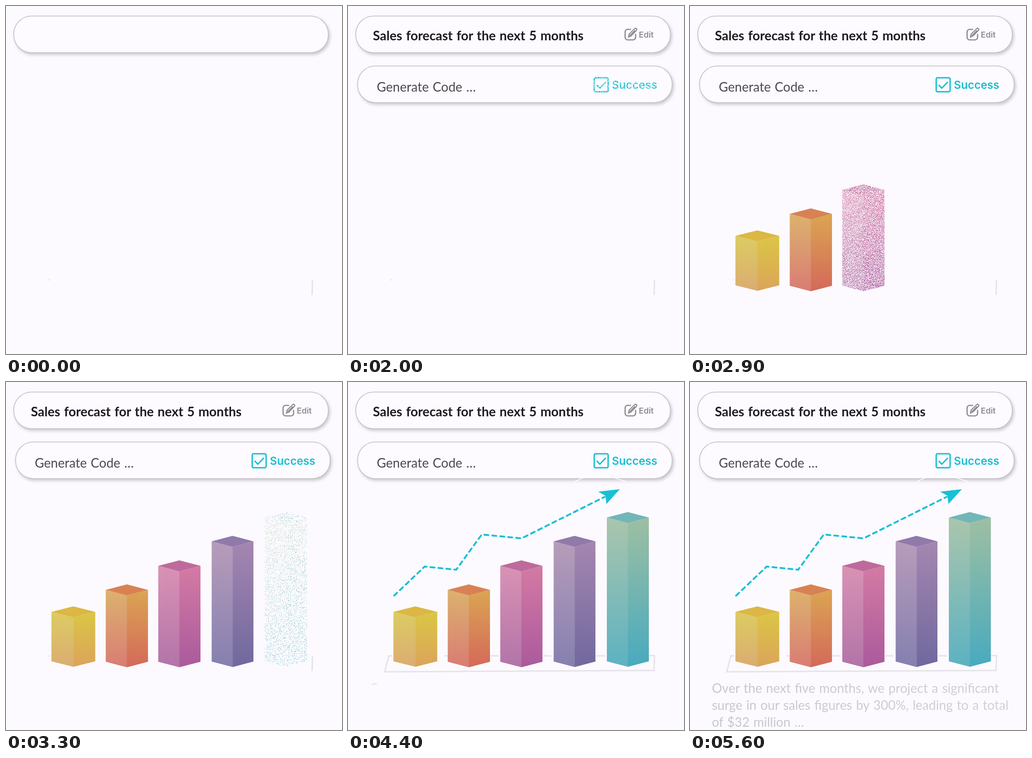
Animation of 736x760 px, one loop 5.7 s. Source, as an HTML page:

```html
<!DOCTYPE html>
<html lang="en">
<head>
<meta charset="utf-8">
<title>Sales forecast</title>
<style>
  html, body { margin: 0; width: 100%; height: 100%; overflow: hidden; background: #fcfafe; }
  svg { display: block; width: 736px; height: 760px; }
  text { font: 28px Lato, sans-serif; word-spacing: 1.5px; }
  .title { font-size: 28.3px; font-weight: 700; fill: #1d1c20; }
  .ui { font-family: Inter, sans-serif; font-weight: 600; }
  .line { fill: none; stroke-linecap: round; stroke-linejoin: round; }
  .pill { fill: #fdfbff; stroke: #c1bfc3; stroke-width: 1.6; filter: drop-shadow(3px 4px 3px rgba(0,0,0,.19)); }
  .floor { fill: none; stroke: #e5e3e8; stroke-width: 3; }
</style>
</head>
<body>
<svg viewBox="0 0 736 760">
  <defs>
    <filter id="dissolve" filterUnits="userSpaceOnUse" x="0" y="0" width="736" height="760" color-interpolation-filters="sRGB">
      <feTurbulence type="fractalNoise" baseFrequency="0.77" numOctaves="2" seed="7"/>
      <feColorMatrix id="grain" result="specks"/>
      <feComposite in="SourceGraphic" in2="specks" operator="in"/>
    </filter>
    <linearGradient id="sweep" x1="0" y1="0" x2="1" y2="1">
      <stop id="edgeIn" stop-color="#fff"/>
      <stop id="edgeOut" stop-color="#000"/>
    </linearGradient>
    <mask id="wipe" maskUnits="userSpaceOnUse" x="0" y="640" width="736" height="120">
      <rect x="46" y="655" width="670" height="105" fill="url(#sweep)"/>
    </mask>
    <linearGradient id="pale" gradientUnits="userSpaceOnUse" x1="49" y1="0" x2="698" y2="0">
      <stop stop-color="#c7c7ca"/><stop offset="1" stop-color="#d2d0d5"/>
    </linearGradient>
  </defs>

  <rect class="pill" x="17" y="22" width="689" height="80" rx="39"/>
  <circle cx="94.5" cy="598" r="1.5" fill="#e3e1e6"/>
  <path class="floor" d="M671.3 598L670.5 631"/>

  <g id="floor">
    <path class="floor" d="M97 598H89.5L80.5 633L671 630M211 598h7M312 598h18M428 598h17M544 598h19M659 597.5h13"/>
  </g>
  <text id="title" class="title" x="54.5" y="74.5">Sales forecast for the next 5 months</text>
  <g id="edit" fill="#8d8b90">
    <g class="line" stroke="#8d8b90">
      <path stroke-width="2.7" d="M619 51h-6.5a5.5 5.5 0 0 0-5.5 5.5v12a5.5 5.5 0 0 0 5.5 5.5h12a5.5 5.5 0 0 0 5.5-5.5v-6.5"/>
      <path stroke-width="2.3" d="M614 68l2-7 12-11.5a2.6 2.6 0 0 1 3.7 3.7l-11.7 12.3zM617.5 64.5l10.5-10.5"/>
    </g>
    <text class="ui" x="637" y="68.5" style="font-size:17.6px">Edit</text>
  </g>
  <g id="pill"><rect class="pill" x="21" y="131" width="689" height="80" rx="39"/></g>
  <text id="code" x="63" y="187" fill="#4b494e">Generate Code …</text>
  <g id="success" fill="#18bfd1">
    <g class="line" stroke="#18bfd1" stroke-width="3">
      <rect x="539.3" y="156.7" width="30.5" height="30.5" rx="3"/>
      <path d="M545.5 173l6 6.5L564 166.5"/>
    </g>
    <text class="ui" x="578" y="181" style="font-size:24.2px">Success</text>
  </g>
  <g id="bars"></g>
  <g id="trend">
    <path class="line" stroke="#fff" stroke-width="1.5" d="M497 218Q508 211 521 208M582 209L608 217"/>
    <path class="line" stroke="#18c0d4" stroke-width="4" stroke-dasharray="9 8.5" d="M101 466.5L168 403L237 410L293 333L380 341.5L562 251"/>
    <path fill="#18c0d4" d="M595.5 234L548 239.5L564 248.5L566 266.5Z"/>
  </g>
  <g mask="url(#wipe)" fill="url(#pale)">
    <text x="48" y="679">Over the next five months, we project a significant</text>
    <text x="48" y="716">surge in our sales figures by 300%, leading to a total</text>
    <text x="48" y="753">of $32 million …</text>
  </g>
</svg>
<script>
const LOOP = 5700, STEP = 100;
const $ = id => document.getElementById(id);
const clamp = v => Math.min(1, Math.max(0, v));

// left, right, top, base, top colour, left side gradient, right side gradient
const bars = [
  [99.5, 195.5, 490, 622, '#dcb745', '#dccc62', '#dbac72', '#dbc645', '#dba45a'],
  [218.5, 311, 442, 623, '#d88254', '#dcb26e', '#d97c74', '#dba552', '#d4695a'],
  [333.5, 426, 389.5, 623, '#be6a9c', '#d992b4', '#b274a8', '#d47aa4', '#aa5a9c'],
  [450.5, 542, 336, 622.5, '#8f7aa9', '#b79cba', '#8580b0', '#a586b0', '#70689e'],
  [567, 659, 284, 622, '#72b6b8', '#abc5ac', '#5cb2c2', '#9ebfa2', '#48aabf']
];

const gradient = (id, from, to) =>
  `<linearGradient id="${id}" x2="0" y2="1"><stop stop-color="${from}"/><stop offset="1" stop-color="${to}"/></linearGradient>`;

$('bars').innerHTML = bars.map(([l, r, top, base, lid, l1, l2, r1, r2], i) => {
  const m = (l + r) / 2, side = top + 12, front = top + 24, foot = base - 12;
  return `<g id="bar${i}">${gradient('l' + i, l1, l2)}${gradient('r' + i, r1, r2)}
    <path fill="url(#l${i})" d="M${l} ${side}L${m + .4} ${front}V${base}L${l} ${foot}Z"/>
    <path fill="url(#r${i})" d="M${r} ${side}L${m} ${front}V${base}L${r} ${foot}Z"/>
    <path fill="${lid}" d="M${l} ${side}L${m} ${top}L${r} ${side}L${m} ${front}Z"/></g>`;
}).join('');

// layer, start and end of its dissolve in ms; no two overlap
const entrances = [
  ['title', 40, 390], ['edit', 390, 740], ['pill', 790, 1100], ['success', 1750, 2100],
  ...[2310, 2555, 2800, 3040, 3276].map((start, i) => ['bar' + i, start, start + 200]),
  ['floor', 3520, 3800], ['trend', 3800, 4110]
];

function dissolve(id, p) {
  const layer = $(id), partial = p > 0 && p < 1;
  layer.style.display = p > 0 ? '' : 'none';
  layer.style.filter = partial ? 'url(#dissolve)' : 'none';
  if (!partial) return;
  // the noise is bell-shaped, so the cut follows its quantile
  const cut = 0.5 - 0.08 * Math.log(p / (1 - p)), slope = 30;
  $('grain').setAttribute('values', `${'0 '.repeat(15)}${slope} 0 0 0 ${0.5 - slope * cut}`);
}

function draw(t) {
  for (const [id, start, end] of entrances) dissolve(id, clamp((t - start) / (end - start)));

  // the status line is stretched upright and settles
  const p = clamp((t - 1200) / 400), stretch = 1 + 6.2 * (1 - p);
  $('code').setAttribute('transform', `translate(0 ${178 * (1 - stretch)}) scale(1 ${stretch})`);
  $('code').style.opacity = p;

  // the summary is swept in from the top left corner
  const edge = Math.max(0, (t - 4366) * 0.0013);
  $('edgeIn').setAttribute('offset', clamp(edge - 0.03));
  $('edgeOut').setAttribute('offset', clamp(edge));
  $('edgeOut').setAttribute('stop-color', edge > 1.03 ? '#fff' : '#000');
}

let shown = -1;
const begin = performance.now();
function tick() {
  const t = Math.floor((performance.now() - begin) % LOOP / STEP) * STEP;
  if (t !== shown) draw(shown = t);
  requestAnimationFrame(tick);
}
tick();
</script>
</body>
</html>
```
